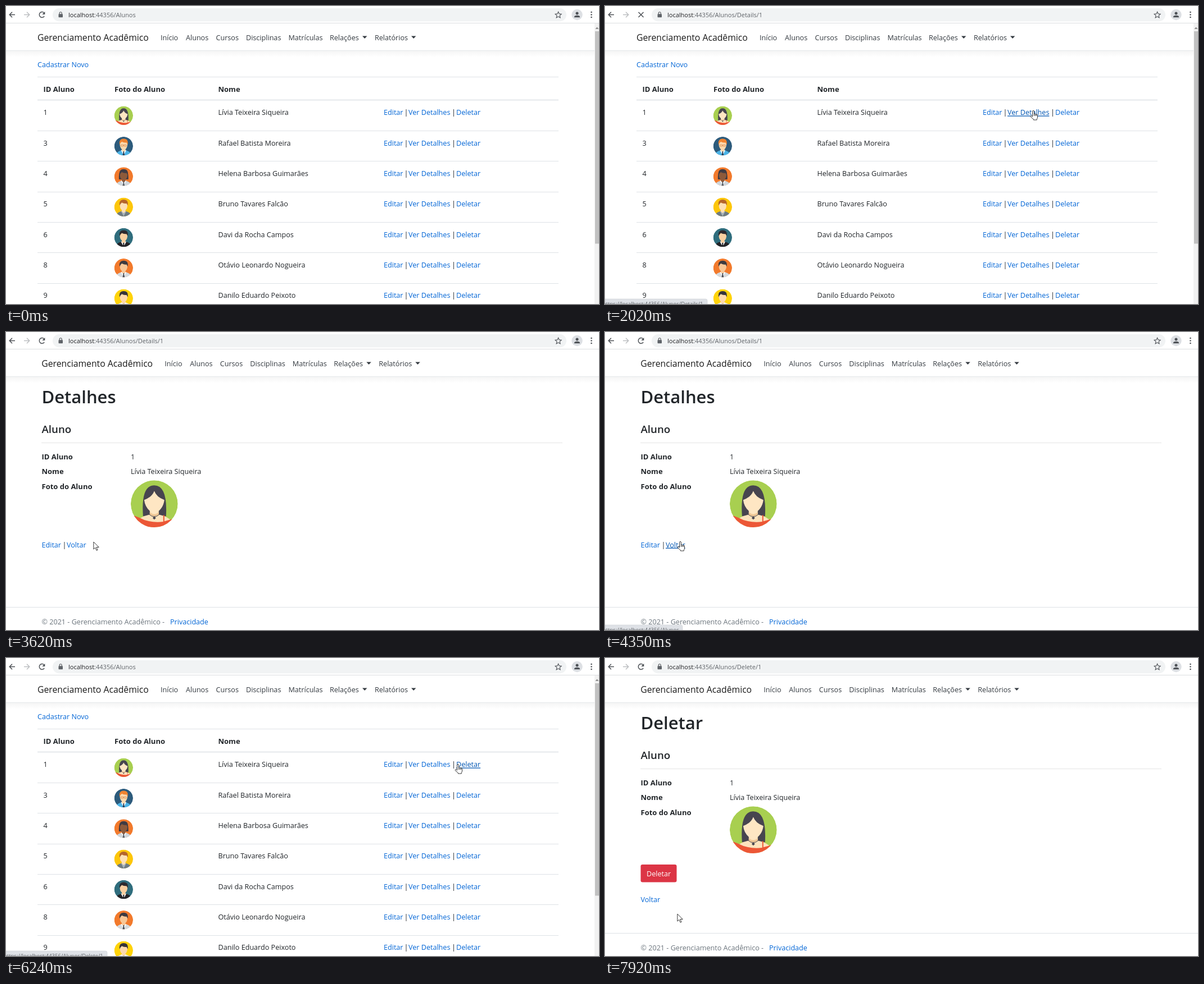
An HTML page for the animation above (7.99 s loop, 1055 px wide and 531 px high).

```html
<!DOCTYPE html>
<html lang="pt-BR">
<head>
<meta charset="utf-8">
<title>Gerenciamento Acadêmico</title>
<style>
  html, body { margin: 0; width: 100%; height: 100%; overflow: hidden; background: #fff; }
  svg { display: block; }
  text { font: 12.6px "Open Sans", "Noto Sans", sans-serif; fill: #212529; white-space: pre; }
  .bold { font-weight: 700; font-size: 13px; }
  .brand { font-size: 15.75px; fill: #191919; }
  .nav { fill: #343a40; }
  .h1 { font-size: 31px; font-weight: 600; }
  .h4 { font-size: 18.7px; font-weight: 600; }
  .muted { fill: #6c757d; }
  .white { fill: #fff; }
  .url { font-size: 11px; fill: #202124; }
  .url tspan { fill: #5f6368; }
  .status { font-size: 9.5px; fill: #5f6368; }
  .link { fill: #0366d6; }
  .link.hot { fill: #0056b3; text-decoration: underline; }
  .line { stroke: #dee2e6; fill: none; }
  .icon { fill: none; stroke: #4d5156; stroke-width: 1.5; }
  #pointer, #bubble { pointer-events: none; }
</style>
</head>
<body>
<svg id="stage" width="1055" height="531" viewBox="0 0 1055 531"></svg>
<script>
const LOOP = 7990;
const stage = document.getElementById('stage');

const text = (x, y, str, cls = '') => `<text x="${x}" y="${y}" class="${cls}">${str}</text>`;
const link = (x, y, str) => text(x, y, str, 'link');
const path = (d, fill, extra = '') => `<path d="${d}" fill="${fill}" ${extra}/>`;
const rule = (x1, x2, y, extra = '') => `<path class="line" d="M${x1} ${y}H${x2}" ${extra}/>`;

// Avatars are drawn in a circle of radius 42 around the origin.
const woman = () =>
  path('M-20 22Q-24-33 0-33Q24-33 21 22z', '#47454f') +
  path('M-32 32Q-26 23-8 19V8H8V19Q26 23 32 32V42H-32z', '#fde3bd') +
  path('M-8 15Q0 22 8 15V20Q0 25-8 20z', '#efc796') +
  path('M-18-7Q-4-12 0-23Q4-12 18-7Q16 10 0 18Q-16 10-18-7z', '#fee6c3') +
  path('M-10 18Q0 28 10 18', 'none', 'stroke="#47454f"') +
  path('M0 22l3 3-3 3-3-3z', '#47454f') +
  path('M-36 21L-28 24Q-8 35 16 32V20H18V31L32 27 42 42H-42z', '#ec5736');

const person = ({ hair, skin, coat, shirt = '#fff', tie, long, glasses }) =>
  (long ? path('M-21 13Q-24-32 0-32Q24-32 21 13z', hair) : '') +
  path('M-35 42Q-34 25-10 19H10Q34 25 35 42z', coat) +
  path('M-12 18L0 42 12 18z', shirt) +
  path('M-8 8H8V20L0 27-8 20z', skin) +
  path('M-17-14Q-17-27 0-27T17-14Q18 6 8 14Q0 19-8 14Q-18 6-17-14z', skin) +
  path('M-18-6Q-23-32 0-33Q23-33 18-6L13-16Q0-14-8-20L-14-14z', hair) +
  (tie ? path('M-4 24H4L2 28 5 42H-5L-2 28z', tie) : '') +
  (glasses ? path('M-12-6H-2V1H-12zM2-6H12V1H2zM-2-4H2', 'none', 'stroke="#d98a4c" stroke-width="2"') : '');

const students = [
  [1, 'Lívia Teixeira Siqueira', '#a8cf50', woman()],
  [3, 'Rafael Batista Moreira', '#2d5b7c',
    person({ hair: '#f18330', skin: '#fdd9ae', coat: '#4cb4e7', tie: '#2b3f55', glasses: true })],
  [4, 'Helena Barbosa Guimarães', '#f27a2c',
    person({ hair: '#403b43', skin: '#8d5a3b', coat: '#cfd6db', tie: '#5b6068', long: true })],
  [5, 'Bruno Tavares Falcão', '#fdc60a',
    person({ hair: '#b5652b', skin: '#fde0b5', coat: '#6f7c83', shirt: '#a9b4b9' })],
  [6, 'Davi da Rocha Campos', '#2f6d7d',
    person({ hair: '#2d2a2e', skin: '#f8cfa0', coat: '#232327', tie: '#232327' })],
  [8, 'Otávio Leonardo Nogueira', '#f27a2c',
    person({ hair: '#3d3a40', skin: '#f8c797', coat: '#d5dade', tie: '#4a4d55' })],
  [9, 'Danilo Eduardo Peixoto', '#ffd30a',
    person({ hair: '#35333a', skin: '#fdd9ae', coat: '#eef1f3', tie: '#3d7fb0' })],
];

const avatar = ([, , color, figure], x, y, r) =>
  `<g transform="translate(${x} ${y}) scale(${r / 42})" clip-path="url(#disc)">
    <circle r="42" fill="${color}"/>${figure}</g>`;

const studentRow = (student, i) => {
  const dy = 54.3 * i, y = 194.4 + dy;
  return text(66.5, y, student[0]) + avatar(student, 209.3, 195.3 + dy, 16.7) +
    text(377.5, y, student[1]) + link(672, y, 'Editar') + text(708.5, y, '|') +
    link(716, y, 'Ver Detalhes') + text(793, y, '|') + link(801, y, 'Deletar') +
    rule(56, 983, Math.round(222 + dy) + .5);
};

const listScreen = () =>
  link(56, 108.5, 'Cadastrar Novo') + rule(56, 983, 126.5) +
  text(66.5, 152.5, 'ID Aluno', 'bold') + text(193, 152.5, 'Foto do Aluno', 'bold') +
  text(377.5, 152.5, 'Nome', 'bold') + rule(56, 983, 167.5, 'stroke-width="1.6"') +
  students.map(studentRow).join('') +
  '<rect x="1047" y="31" width="8" height="500" fill="#f1f1f1"/>' +
  '<rect x="1048" y="45" width="7" height="378.500" fill="#c1c1c1"/>' +
  path('M1048.500 41l3-3.500 3 3.500z', '#8a8a8a');

const recordScreen = (title, actions) =>
  text(63.5, 127, title, 'h1') + text(63.5, 180, 'Aluno', 'h4') +
  rule(63, 990, 197.5, 'style="stroke:#e5e5e5"') +
  ['ID Aluno', 'Nome', 'Foto do Aluno'].map((s, i) => text(63.5, 226.6 + 26.6 * i, s, 'bold')).join('') +
  text(222, 226.6, students[0][0]) + text(222, 253.2, students[0][1]) +
  avatar(students[0], 263.8, 306.2, 41.9) + actions +
  rule(0, 1055, 490.5) +
  text(63.5, 521, '© 2021 - Gerenciamento Acadêmico -', 'muted') + link(292, 521, 'Privacidade');

const screens = {
  list: listScreen(),
  details: recordScreen('Detalhes',
    link(63.5, 383.6, 'Editar') + text(100.5, 383.6, '|') + link(108, 383.6, 'Voltar')),
  remove: recordScreen('Deletar',
    '<rect x="63.500" y="368" width="64" height="31.500" rx="3.300" fill="#dc3545"/>' +
    text(74, 389.4, 'Deletar', 'white') + link(63.5, 435.3, 'Voltar')),
};

const menu = [[275, 'Início'], [320, 'Alunos'], [373.5, 'Cursos'], [427, 'Disciplinas'],
  [502.5, 'Matrículas'], [576, 'Relações'], [656, 'Relatórios']];
const caret = x => path(`M${x} 53.500h8.400l-4.200 4.400z`, '#343a40');

const navbar = text(56, 61.5, 'Gerenciamento Acadêmico', 'brand') +
  menu.map(([x, label]) => text(x, 60.6, label, 'nav')).join('') + caret(634) + caret(721);

const browserBar = `
  <rect width="1055" height="31" fill="#fff"/>
  <rect y="30" width="1055" height="1" fill="#dcdee1"/>
  <rect x="83" y="4" width="914" height="23.500" rx="11.700" fill="#f1f3f4"/>
  <path class="icon" d="M16 15.500H6.500M11 10.800L6.300 15.500 11 20.200"/>
  <path class="icon" d="M32 15.500H41.500M37 10.800L41.700 15.500 37 20.200" style="stroke:#bcbec1"/>
  <g id="reload"><path class="icon" d="M68.200 18.300A4.900 4.900 0 1 1 67.600 12"/>
    <path d="M69.300 10v5h-5z" fill="#4d5156"/></g>
  <path id="stop" class="icon" d="M59.500 11l9 9m0-9l-9 9"/>
  <rect x="93.500" y="14.300" width="7.500" height="6" rx=".8" fill="#5f6368"/>
  <path class="icon" style="stroke-width:1.100" d="M95.200 14.500V12.800a2 2 0 0 1 4 0V14.500"/>
  <path class="icon" style="stroke-width:1.100" d="M982.600 10.300l1.600 3.600 3.900.4-2.900 2.600.8 3.900-3.400-2-3.400 2 .8-3.900-2.900-2.600 3.900-.4z"/>
  <circle cx="1016" cy="15.500" r="9.700" fill="#dde0e4"/>
  <circle cx="1016" cy="13" r="2.500" fill="#4d5156"/>
  <path d="M1011 20.300v-1q0-2.600 5-2.600t5 2.600v1z" fill="#4d5156"/>
  ${[11, 15.5, 20].map(y => `<circle cx="1041.500" cy="${y}" r="1.300" fill="#4d5156"/>`).join('')}
  <text x="111" y="19.800" class="url">localhost<tspan id="url"></tspan></text>`;

stage.innerHTML = `
  <defs>
    <clipPath id="disc"><circle r="42"/></clipPath>
    <linearGradient id="shade" x2="0" y2="1">
      <stop stop-color="#f4f4f4"/><stop offset="1" stop-color="#fff"/>
    </linearGradient>
  </defs>
  <rect y="79" width="1055" height="12" fill="url(#shade)"/>
  <rect y="79" width="1055" height="1" fill="#e4e7ea"/>
  <g id="navbar">${navbar}</g>
  ${Object.entries(screens).map(([id, body]) => `<g id="${id}">${body}</g>`).join('')}
  ${browserBar}
  <g id="bubble">
    <rect id="plate" x="-6" y="522" height="20" rx="3" fill="#dee1e6" stroke="#cfd2d6" stroke-width=".6"/>
    <text id="status" x="-4" y="534" class="status"></text>
  </g>
  <g id="pointer" fill="#fff" stroke="#222" stroke-width=".9" stroke-linejoin="round">
    <path id="arrow" d="M0 0V13l3-2.800 2.200 5 2-.9-2.100-4.800h4.300z"/>
    <path id="hand" d="M-1.400 10V.8a1.400 1.400 0 0 1 2.800 0V5.600q1.100-.9 2.200.2 1.200-.7 2.100.4 1.800-.5 1.800 1.400v3.400q0 2-1.200 3.500v1.500h-6v-1.300L-4.600 10.600q-1-1.600.4-2 1-.2 2.800 1.400zM1.400 5.600V9M3.600 5.800V9M5.700 6.200V9"/>
  </g>`;

const el = id => document.getElementById(id);
const show = (id, on) => { el(id).style.display = on ? '' : 'none'; };
const current = (list, t) => list.filter(step => step[0] <= t).pop();

// [from, path, loading, screen]
const pages = [
  [0, '', false, 'list'],
  [1750, '/Details/1', true, 'list'],
  [2230, '/Details/1', false, 'details'],
  [4680, '', true, 'details'],
  [4950, '', false, 'list'],
  [6570, '/Delete/1', true, 'list'],
  [7050, '/Delete/1', false, 'remove'],
];

// [from, fade in, fade out, path, right edge]
const bubbles = [
  [0, 1400, 2430, '/Details/1', 182],
  [3000, 4120, 5200, '/Edit/1', 168],
  [4290, 4120, 5200, '', 138],
  [6000, 6140, 7480, '/Delete/1', 180],
];

// [time, x, y] of the pointer tip
const track = [
  [330, 991, 460], [1080, 805, 201], [1500, 762, 187], [2270, 762, 187],
  [2360, 739, 203], [2490, 671, 231], [3290, 203, 344], [3620, 156, 374],
  [4020, 84, 379], [4130, 84, 379], [4340, 134, 374], [5050, 134, 374],
  [5420, 640, 223], [5900, 804, 190], [7100, 804, 190], [7300, 757, 261],
  [7920, 129, 456], [7990, 122, 458],
];

// Monotone cubic interpolation: smooth through the points, no overshoot.
function along(axis, t) {
  const last = track.length - 2;
  let i = 0;
  while (i < last && track[i + 1][0] <= t) i++;
  const secant = k => {
    const a = track[Math.max(0, Math.min(k, last))], b = track[Math.max(0, Math.min(k, last)) + 1];
    return (b[axis] - a[axis]) / (b[0] - a[0]);
  };
  const slope = k => {
    const p = secant(k - 1), q = secant(k);
    return p * q > 0 ? 2 * p * q / (p + q) : 0;
  };
  const a = track[i], b = track[i + 1], h = b[0] - a[0], u = (t - a[0]) / h, v = 1 - u;
  return v * v * ((1 + 2 * u) * a[axis] + u * h * slope(i)) +
    u * u * ((1 + 2 * v) * b[axis] - v * h * slope(i + 1));
}

function drawPage(t) {
  const [, url, loading, screen] = current(pages, t);
  for (const id in screens) show(id, id === screen);
  el('navbar').setAttribute('transform', `translate(${screen === 'list' ? 0 : 7.3} 0)`);
  el('url').textContent = ':44356/Alunos' + url;
  show('stop', loading);
  show('reload', !loading);
}

function drawBubble(t) {
  const [, fadeIn, fadeOut, target, right] = current(bubbles, t);
  const opacity = Math.min(1, (t - fadeIn) / 100, (fadeOut - t) / 140);
  el('bubble').style.opacity = Math.max(0, opacity);
  el('plate').setAttribute('width', right + 6);
  el('status').textContent = 'https://localhost:44356/Alunos' + target;
}

function drawPointer(t) {
  const visible = t >= track[0][0];
  const x = along(1, t), y = along(2, t);
  const hot = visible ? document.elementFromPoint(x, y)?.closest('.link') : null;
  document.querySelectorAll('.link').forEach(a => a.classList.toggle('hot', a === hot));
  show('pointer', visible);
  show('hand', hot);
  show('arrow', !hot);
  el('pointer').setAttribute('transform', `translate(${x} ${y})`);
}

function frame() {
  const t = performance.now() % LOOP;
  drawPage(t);
  drawBubble(t);
  drawPointer(t);
  requestAnimationFrame(frame);
}
frame();
</script>
</body>
</html>
```
